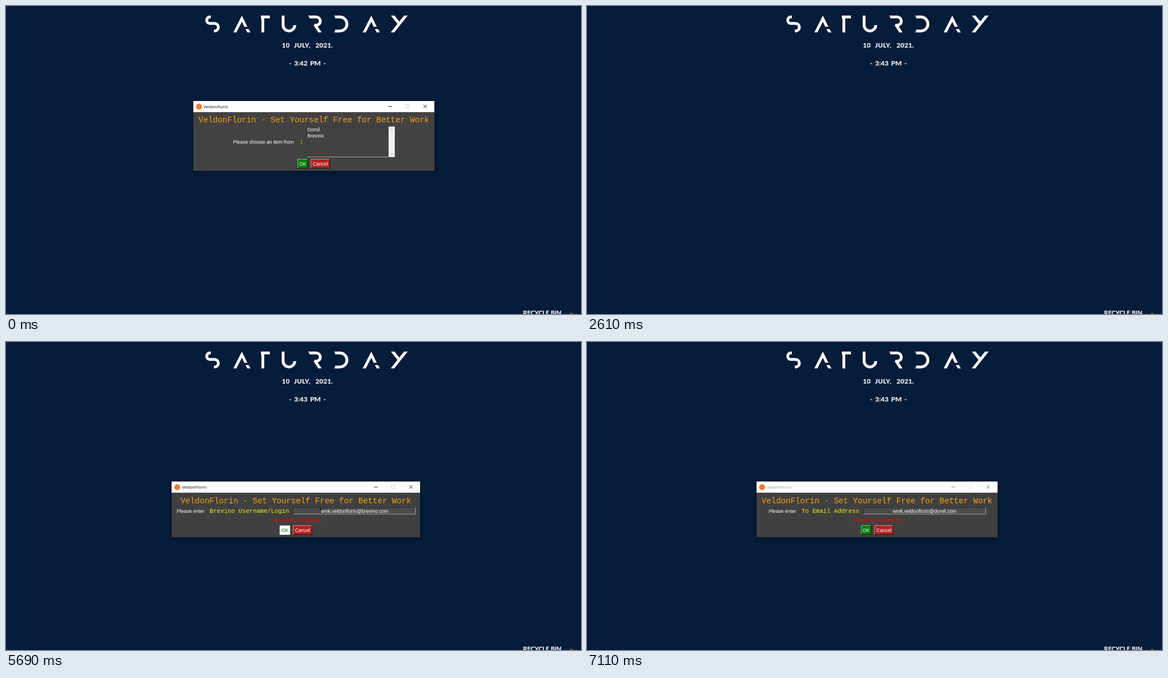
These frames come from a looping animation (1022x548 px, 8 s). An HTML page:

```html
<!DOCTYPE html>
<html lang="en">
<head>
<meta charset="utf-8">
<title>Desktop bot</title>
<style>
  html, body { margin: 0; width: 100%; height: 100%; overflow: hidden; background: #051c3a; }
  svg { display: block; width: 1022px; height: 548px; }
  text { font: 8.7px "Liberation Sans", Arial, sans-serif; fill: #fff; white-space: pre; }
  .desk text { font: 800 12px Lato, Inter, sans-serif; }
  .desk .bin { font-size: 11px; }
  .mid { text-anchor: middle; }
  text.head, text.label { font-family: "Liberation Mono", "Courier New", monospace; }
  text.head { font-size: 14.24px; fill: #f5a00f; }
  text.label { font-size: 10.7px; fill: #f4f012; }
  text.title { font: 7.5px "Open Sans", "Noto Sans", sans-serif; }
  text.error { fill: #f00000; }
  text.count { font: 18px Roboto, sans-serif; }
  text.stars { letter-spacing: .4px; }
  .line { fill: none; stroke-width: 1; }
  .window { filter: drop-shadow(0 1px 3px rgba(0, 0, 0, .45)); }
</style>
</head>
<body>
<svg viewBox="0 0 1022 548">
  <rect width="1022" height="548" fill="#051c3a"/>
  <g class="desk" fill="#fff">
    <g fill="none" stroke="#fff" stroke-width="5">
      <path d="M364 19.5h-1.5a5.8 5.8 0 0 0 0 11.6h8.3a6.7 6.7 0 0 1 0 13.4h-1.3"/>
      <path d="M469 19.5H456.5V47M453 19.5h5"/>
      <path d="M492.5 17V34a10.4 10.4 0 0 0 20.8 0"/>
      <path d="M539 19.5h12.3a7.4 7.4 0 0 1 0 14.8H548"/>
      <path d="M585 19.5h8.5a12.5 12.5 0 0 1 0 25H585"/>
    </g>
    <path id="a" d="M404 47 419.3 17 429 37h-5.6l-4.1-9L409.5 47zM425.6 41h5.5l3.4 6H429z"/>
    <use href="#a" x="230"/>
    <path d="M537 17h5v5h-1.5zM583 17h4v5h-.6zM583 47h4v-5h-.6zM546.5 34h6l8.5 13h-6z"/>
    <path d="M684 17h6.5l9 11-3.4 4.2zM707.5 17h6.5L690 47h-6.2z"/>
    <text x="490.3" y="74.3">10</text>
    <text x="511.8" y="74.3">JULY,</text>
    <text x="550" y="74.3">2021.</text>
    <text x="503" y="106">-</text>
    <text x="512" y="106" id="clock">3:42</text>
    <text x="540.5" y="106">PM</text>
    <text x="564" y="106">-</text>
    <text class="bin" x="919" y="550.3">RECYCLE BIN</text>
    <ellipse cx="1004.7" cy="548.5" rx="3.6" ry="2" fill="#d8694f"/>
  </g>
  <g id="view"></g>
</svg>
<script>
const LOOP = 8000;
const APP = 'VeldonFlorin', MAIL = 'Brevino';
const view = document.getElementById('view');
const clock = document.getElementById('clock');

const rect = (x, y, w, h, fill) =>
  `<rect x="${x}" y="${y}" width="${w}" height="${h}" fill="${fill}"/>`;
const text = (x, y, str, cls = '', fill) =>
  `<text x="${x}" y="${y}" class="${cls}"${fill ? ` style="fill:${fill}"` : ''}>${str}</text>`;
const line = (d, color) => `<path class="line" d="${d}" stroke="${color}"/>`;

// Box with a lit and a shaded pair of edges
const bevel = (x, y, w, h, fill, topLeft, bottomRight) =>
  rect(x, y, w, h, fill) +
  line(`M${x + .5} ${y + h}V${y + .5}H${x + w}`, topLeft) +
  line(`M${x} ${y + h - .5}H${x + w - .5}V${y}`, bottomRight);

const button = (x, y, w, h, label, fill, light) =>
  bevel(x, y, w, h, fill, light, '#1c1010') +
  text(x + w / 2, y + h / 2 + 3.2, label, 'mid');

const okCancel = (x, y, pressed) =>
  (pressed
    ? rect(x, y + .5, 18.5, 16.5, '#fff') + text(x + 9.6, y + 11.8, 'OK', 'mid', '#157a15')
    : button(x, y, 19, 17, 'OK', '#008000', '#7fc07f')) +
  button(x + 23.7, y, 34.3, 17, 'Cancel', '#b22222', '#dc8f8f');

function frame(x, y, w, h, active, body, fill = '#404040') {
  const ink = active ? '#111' : '#999', mark = active ? '#222' : '#808080';
  const r = x + w, my = y + 9.7;
  return `<g class="window">${rect(x, y, w, h, fill)}</g>` +
    rect(x, y, w, 19.8, '#fff') +
    `<circle cx="${x + 10}" cy="${y + 10}" r="5.3" fill="#ee7a35"/>` +
    text(x + 18, y + 12.8, APP, 'title', ink) +
    line(`M${r - 82} ${my}h7`, mark) +
    line(`M${r - 50.5} ${my - 3}h6v6h-6z`, active ? '#d0d0d0' : '#e2e2e2') +
    line(`M${r - 19.5} ${my - 3}l6 6m0 -6l-6 6`, mark) +
    text(x + w / 2, y + 38.2, `${APP} - Set Yourself Free for Better Work`, 'head mid') +
    body;
}

function chooser(x, y, items, { active = true, pick = -1, pressed = false, dark = false } = {}) {
  const lx = x + 202, ly = y + 45.5, fill = dark ? '#424242' : '#4d4d4d';
  const rows = items.map((item, i) =>
    (i === pick ? rect(lx, ly + 1 + i * 10.7, 145, 10.7, '#fff') : '') +
    text(lx + .5, ly + 8.7 + i * 10.7, item, '', i === pick ? '#404040' : '')).join('');
  const body =
    text(x + 70.5, y + 75.6, 'Please choose an item from') +
    text(x + 192, y + 76, '<tspan font-weight="bold">:</tspan>', 'label mid') +
    bevel(lx, ly, 156, 54.5, fill, '#363636', '#a0a0a0') + rows +
    rect(lx + 145, ly, 11, 54, '#f0f0f0') +
    line(`M${lx + 148} ${ly + 6.5}l2.5 -2.5l2.5 2.5M${lx + 148} ${ly + 47.5}l2.5 2.5l2.5 -2.5`, '#b0b0b0') +
    okCancel(x + 185, y + 103, pressed);
  return frame(x, y, 428.3, 124.3, active, body, dark ? '#424242' : '#404040');
}

// Offsets follow from the label's start and its character count
function entry(x, w, labelX, label, value, active, stars) {
  const y = 248.3, fx = labelX + label.length * 6.42 + 6.9, mid = fx + 109;
  const caret = mid - (stars ? 19.3 : 60.5);
  const body =
    text(labelX - 58.5, 303.7, 'Please enter') +
    text(labelX, 304, label, 'label') +
    bevel(fx, 294.3, 218, 12.4, '#4b4b4b', '#303030', '#a4a4a4') +
    text(mid, stars ? 304.2 : 303.7, value, stars ? 'mid stars' : 'mid') +
    (active ? rect(caret - .5, 295.3, 1.2, 10, '#000') : '') +
    text(516, 320, 'This field is mandatory', 'error mid') +
    okCancel(active ? 486.4 : 486.9, 326, active);
  return frame(x, y, w, 99.2, active, body);
}

const popup = n =>
  rect(410, 233, 201.5, 109, '#424242') +
  text(510.7, 244.7, `Launching ${MAIL} BOT in 'Semi Automatic' way.`, 'mid') +
  text(510.5, 265, 'You can change GUI responses', 'mid') +
  text(510.7, 286, n, 'count mid') +
  rect(494, 290.5, 33.3, 33.5, '#fff') +
  '<circle cx="510.6" cy="307.2" r="12" fill="#f47a2a"/>' +
  button(485, 323.7, 51.5, 15.8, 'Exit', '#8b1a1a', '#b07070');

const faded = markup => `<g opacity=".5">${markup}</g>`;
const service = opts => chooser(333, 169, ['Domil', MAIL], { dark: true, ...opts });
const mode = opts => chooser(301.4, 235.5, ['Automatic', 'Semi Automatic'], opts);
const login = on => entry(294.4, 441.6, 362, `${MAIL} Username/Login`, 'wmk.veldonflorin@brevino.com', on);
const password = on => entry(278.4, 473.6, 346.3, `Your ${MAIL} Email Password`, '**********', on, true);
const address = on => entry(301.4, 428.3, 381.4, 'To Email Address', 'wmk.veldonflorin@domil.com', on);

const steps = [
  [0, service()],
  [610, service({ pick: 1 })],
  [1250, service({ pick: 1, pressed: true })],
  [1330, ''],
  [1410, mode({ active: false })],
  [2110, mode()],
  [2190, mode({ pick: 1 })],
  [2530, mode({ pick: 1, pressed: true })],
  [2610, ''],
  ...[2660, 2980, 3320, 3670, 3990, 4330].map((t, i) => [t, popup(6 - i)]),
  [4680, ''],
  [4710, login(false)],
  [5690, login(true)],
  [5770, ''],
  [5900, password(false)],
  [6910, password(true)],
  [6970, faded(password(true))],
  [7010, ''],
  [7060, faded(address(false))],
  [7110, address(false)]
];

let shown = null;
const start = performance.now();
function draw(now) {
  const t = Math.max(0, now - start) % LOOP;
  const step = steps.findLast(s => s[0] <= t);
  if (step !== shown) {
    view.innerHTML = step[1];
    shown = step;
  }
  clock.textContent = t < 720 ? '3:42' : '3:43';
  requestAnimationFrame(draw);
}
draw(start);
</script>
</body>
</html>
```
